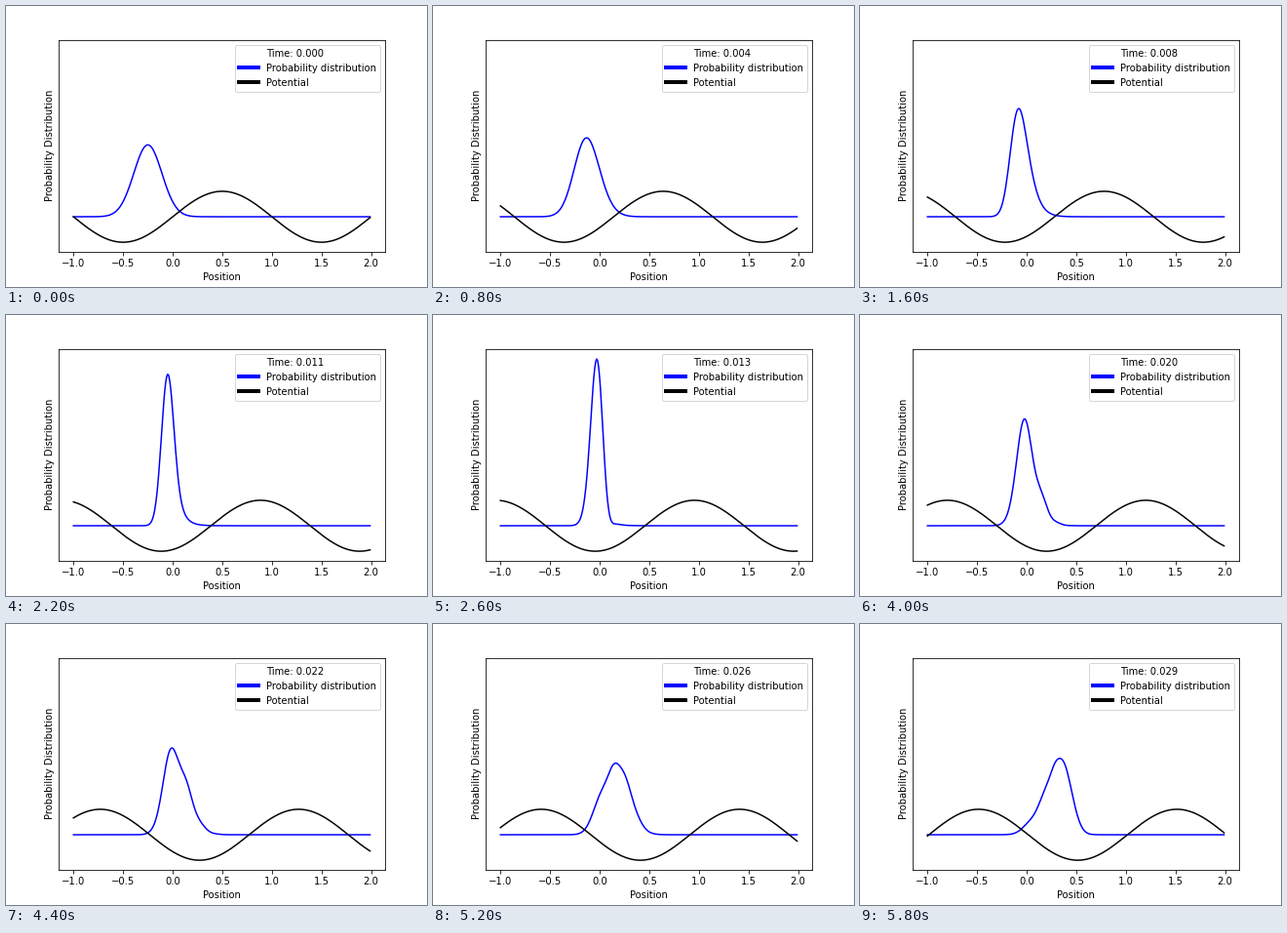
These frames come from a looping animation (432x288 px, 6 s). A matplotlib script:

```python
import numpy as np
import matplotlib.pyplot as plt
from matplotlib.animation import FuncAnimation
from matplotlib.lines import Line2D
from matplotlib.ticker import MultipleLocator

FRAMES = 30
FRAME_DT = 0.001
SUBSTEPS = 100

# Wave packet in a travelling sine potential, i psi_t = -psi_xx + V psi
DEPTH = 1000
SPEED = 35
CENTER, WIDTH, WAVENUMBER = -0.25, 0.2, 20

x = np.arange(300) * 0.01 - 1


def potential(t):
    return np.sin(np.pi * (x - SPEED * t))


def evolve():
    """Split-step Fourier solution, one density per frame."""
    dt = FRAME_DT / SUBSTEPS
    k = 2 * np.pi * np.fft.fftfreq(x.size, x[1] - x[0])
    half_kick = np.exp(-0.5j * dt * k**2)
    psi = np.exp(-(x - CENTER)**2 / (2 * WIDTH**2) + 1j * WAVENUMBER * x)
    psi /= np.sqrt(WIDTH * np.sqrt(np.pi))

    densities = [np.abs(psi)**2]
    for step in range((FRAMES - 1) * SUBSTEPS):
        v = DEPTH * potential((step + 0.5) * dt)
        psi = np.fft.ifft(half_kick * np.fft.fft(psi))
        psi = np.fft.ifft(half_kick * np.fft.fft(np.exp(-1j * dt * v) * psi))
        if (step + 1) % SUBSTEPS == 0:
            densities.append(np.abs(psi)**2)
    return densities


def padded(low, high, margin=0.05):
    pad = margin * (high - low)
    return low - pad, high + pad


densities = evolve()

plt.rcParams.update({"font.family": "DejaVu Sans", "font.size": 10})
fig, ax = plt.subplots(figsize=(6, 4), dpi=72)
fig.subplots_adjust(left=0.125, right=0.9, bottom=0.125, top=0.88)

density_line, = ax.plot(x, densities[0], color="blue", lw=1.5)
potential_line, = ax.plot(x, potential(0), color="black", lw=1.5)

ax.set_xlim(*padded(x[0], x[-1]))
ax.set_ylim(*padded(-1, 6.57))
ax.xaxis.set_major_locator(MultipleLocator(0.5))
ax.set_yticks([])
ax.set_xlabel("Position")
ax.set_ylabel("Probability Distribution")

handles = [Line2D([0], [0], color=c, lw=4) for c in ("white", "blue", "black")]
legend = ax.legend(
    handles,
    ["Time: 0.000", "Probability distribution", "Potential"],
    loc="upper right",
)
time_text = legend.get_texts()[0]


def update(i):
    t = i * FRAME_DT
    density_line.set_ydata(densities[i])
    potential_line.set_ydata(potential(t))
    time_text.set_text(f"Time: {t:.3f}")
    return density_line, potential_line, time_text


anim = FuncAnimation(fig, update, frames=FRAMES, interval=200, repeat=True)
plt.show()
```
